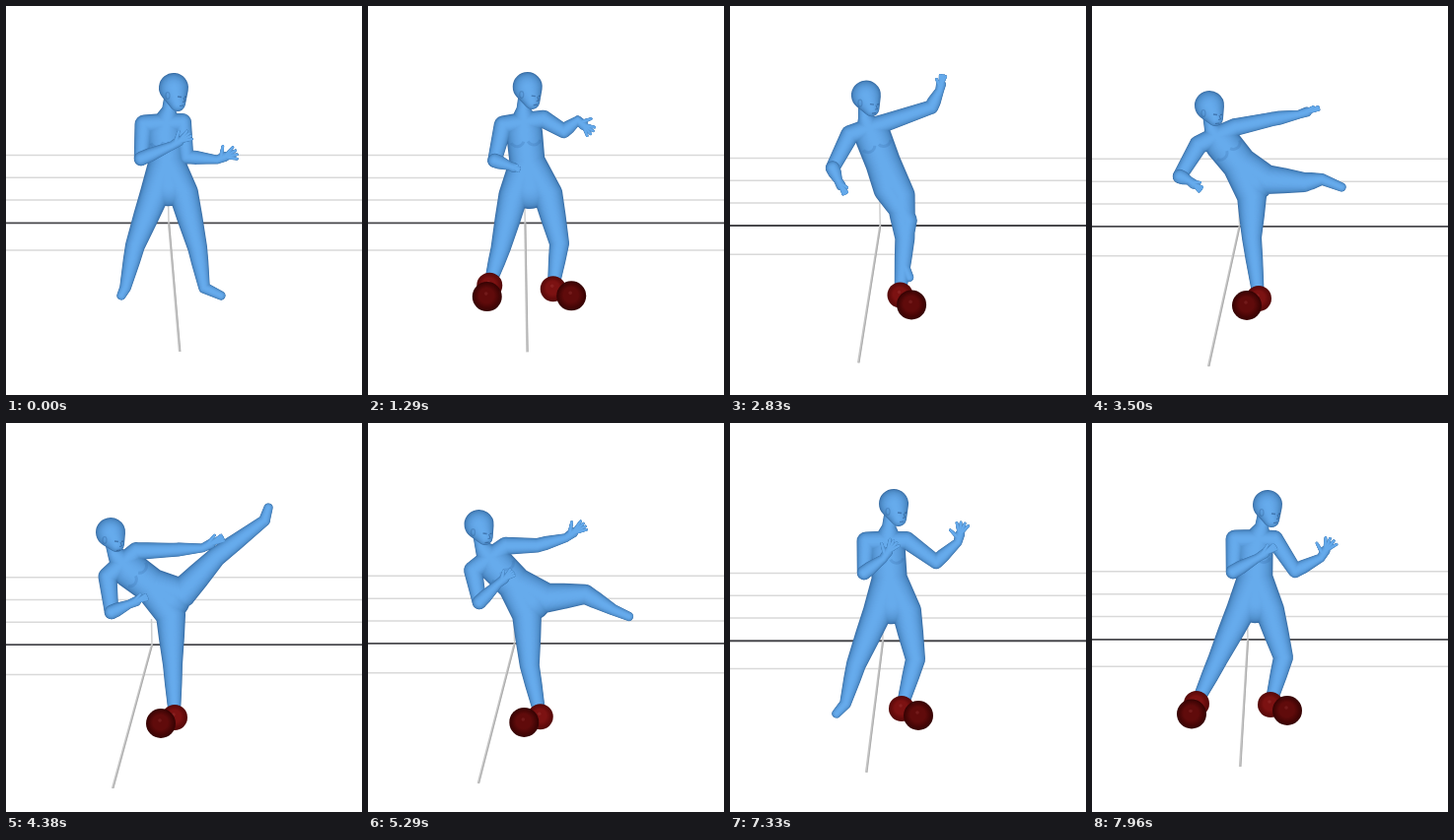
Recreate the animation shown at these times as an HTML page with a canvas. Size 361x395 px, loop 8000 ms.

```html
<!DOCTYPE html>
<html lang="en">
<head>
<meta charset="utf-8">
<title>Side kick</title>
<style>
  html, body { margin: 0; width: 100%; height: 100%; overflow: hidden; background: #fff; }
  canvas { display: block; width: 361px; height: 395px; }
</style>
</head>
<body>
<canvas id="stage" width="361" height="395"></canvas>
<script>
const ctx = document.getElementById('stage').getContext('2d');
const LOOP = 8000;
const tracks = {};

// A pose may list only some joints; each joint keeps its own timeline.
// Suffixes: A = guarding arm, B = reaching arm, K = kicking leg, S = standing leg.
function pose(time, joints) {
  for (const name in joints) (tracks[name] ||= []).push({ time, value: joints[name] });
}

pose(0, {
  head: [170, 83], jaw: [174, 99], neck: [165, 106],
  shoulderA: [140, 120], elbowA: [137, 155], wristA: [168, 142], tipA: [186, 131], spreadA: [.25],
  shoulderB: [179, 118], elbowB: [183, 153], wristB: [214, 156], tipB: [233, 149], spreadB: [.35],
  hipK: [151, 190], kneeK: [131, 243], heelK: [121, 286], toeK: [117, 294],
  hipS: [180, 190], kneeS: [194, 245], heelS: [201, 286], toeS: [218, 294],
  axis: [165], axisEnd: [176, 351]
});
pose(900, { heelK: [120, 286], toeK: [117, 296], tipB: [233, 147], axisEnd: [168, 351] });
pose(1650, { axisEnd: [154, 352], heelK: [128, 282], toeK: [126, 294] });
pose(2250, {
  head: [152, 84], jaw: [157, 98], neck: [149, 107],
  shoulderA: [132, 124], elbowA: [119, 160], wristA: [125, 175], tipA: [130, 187], spreadA: [.15],
  shoulderB: [173, 114], elbowB: [210, 107], wristB: [212, 86], tipB: [207, 67], spreadB: [.32],
  hipK: [149, 192], kneeK: [144, 243], heelK: [139, 285], toeK: [138, 294],
  hipS: [181, 192], kneeS: [190, 238], heelS: [178, 289], toeS: [196, 296],
  axis: [155], axisEnd: [141, 354]
});
pose(2520, { elbowB: [213, 99], wristB: [213, 77], tipB: [209, 58], axisEnd: [136, 360] });
pose(2900, {
  kneeK: [184, 214], heelK: [180, 255], toeK: [188, 270],
  heelS: [172, 294], toeS: [182, 304]
});
pose(3500, {
  head: [119, 101], jaw: [125, 114], neck: [121, 125],
  shoulderA: [108, 141], elbowA: [89, 173], wristA: [98, 177], tipA: [110, 186], spreadA: [.2],
  shoulderB: [145, 123], elbowB: [182, 115], wristB: [210, 110], tipB: [229, 104], spreadB: [.08],
  hipK: [176, 176], kneeK: [215, 179], heelK: [233, 176], toeK: [253, 184],
  hipS: [162, 193], kneeS: [162, 235], heelS: [169, 297], toeS: [157, 304],
  axis: [149.5], axisEnd: [118, 366]
});
pose(3900, { kneeK: [220, 160], heelK: [254, 136], toeK: [268, 127] });
pose(4380, {
  head: [106, 111], jaw: [112, 123], neck: [110, 133],
  shoulderA: [103, 156], elbowA: [107, 192], wristA: [125, 184], tipA: [142, 177], spreadA: [.15],
  shoulderB: [132, 130], elbowB: [165, 129], wristB: [199, 127], tipB: [219, 117], spreadB: [.15],
  hipK: [178, 173], kneeK: [213, 136], heelK: [262, 99], toeK: [266, 86],
  hipS: [167, 195], kneeS: [169, 245], heelS: [171, 299], toeS: [157, 305],
  axis: [148], axisEnd: [108, 371]
});
pose(5040, { axisEnd: [110, 368] });
pose(5250, { kneeK: [220, 172], heelK: [250, 186], toeK: [266, 192] });
pose(6130, {
  head: [126, 93], jaw: [132, 107], neck: [127, 118],
  shoulderA: [114, 139], elbowA: [118, 168], wristA: [137, 143], tipA: [148, 130], spreadA: [.3],
  shoulderB: [152, 119], elbowB: [183, 121], wristB: [207, 107], tipB: [222, 92], spreadB: [.35],
  hipK: [178, 183], kneeK: [215, 212], heelK: [202, 254], toeK: [207, 275],
  hipS: [158, 193], kneeS: [162, 245], heelS: [178, 297], toeS: [163, 303],
  axis: [150], axisEnd: [119, 360]
});
pose(6690, {
  kneeK: [176, 231], heelK: [160, 268], toeK: [160, 284],
  heelS: [178, 296], toeS: [181, 304], axisEnd: [126, 368]
});
pose(7330, {
  head: [166, 82], jaw: [171, 97], neck: [161, 106],
  shoulderA: [138, 120], elbowA: [136, 152], wristA: [155, 138], tipA: [167, 121], spreadA: [.3],
  shoulderB: [179, 119], elbowB: [209, 141], wristB: [231, 121], tipB: [236, 102], spreadB: [.35],
  hipK: [150, 191], kneeK: [128, 245], heelK: [117, 285], toeK: [108, 295],
  hipS: [179, 191], kneeS: [188, 240], heelS: [174, 290], toeS: [191, 297],
  axis: [155], axisEnd: [138, 355]
});
pose(7960, {
  head: [178, 83], jaw: [182, 98], neck: [172, 106],
  shoulderA: [145, 118], elbowA: [143, 151], wristA: [168, 137], tipA: [185, 126], spreadA: [.15],
  shoulderB: [185, 118], elbowB: [206, 150], wristB: [232, 137], tipB: [243, 119], spreadB: [.35],
  hipK: [151, 190], kneeK: [127, 241], heelK: [106, 285], toeK: [101, 295.5],
  hipS: [180, 190], kneeS: [194, 238], heelS: [181, 286], toeS: [198, 292],
  axis: [158], axisEnd: [150, 349]
});

// Cubic Hermite through the keys of one joint.
function sample(keys, t) {
  const last = keys.length - 1;
  t = Math.min(t, keys[last].time);
  let i = 0;
  while (i < last - 1 && t >= keys[i + 1].time) i++;
  const a = keys[i], b = keys[i + 1];
  const span = b.time - a.time, u = (t - a.time) / span;
  const slope = (k, n) => {
    const p = keys[Math.max(k - 1, 0)], q = keys[Math.min(k + 1, last)];
    return (q.value[n] - p.value[n]) / (q.time - p.time) * span;
  };
  return a.value.map((from, n) => {
    const d = b.value[n] - from, m0 = slope(i, n), m1 = slope(i + 1, n);
    return from + u * (m0 + u * (3 * d - 2 * m0 - m1 + u * (m0 + m1 - 2 * d)));
  });
}

const mix = (a, b, u) => a.map((v, n) => v + (b[n] - v) * u);
const dist = (a, b) => Math.hypot(b[0] - a[0], b[1] - a[1]);
const at = (p, r) => ({ p, r });

function capsule(a, b, s) {
  const ra = a.r * s, rb = b.r * s;
  const d = dist(a.p, b.p) || .01;
  const dir = Math.atan2(b.p[1] - a.p[1], b.p[0] - a.p[0]);
  const phi = Math.acos(Math.max(-1, Math.min(1, (ra - rb) / d)));
  ctx.moveTo(a.p[0] + ra * Math.cos(dir + phi), a.p[1] + ra * Math.sin(dir + phi));
  ctx.arc(a.p[0], a.p[1], ra, dir + phi, dir - phi + 2 * Math.PI);
  ctx.arc(b.p[0], b.p[1], rb, dir - phi, dir + phi);
  ctx.closePath();
}

// Nested shrinking copies give a rounded, lit surface.
const EDGE = [56, 110, 166], LIT = [103, 172, 237];
function solid(limbs) {
  for (let s = 1; s > .15; s -= .06) {
    ctx.fillStyle = `rgb(${mix(EDGE, LIT, (1 - s * s) ** .55).map(Math.round)})`;
    ctx.beginPath();
    for (const limb of limbs)
      for (let i = 1; i < limb.length; i++) capsule(limb[i - 1], limb[i], s);
    ctx.fill();
  }
}

function hand(wrist, tip, spread) {
  const palm = mix(wrist, tip, .42);
  const dir = Math.atan2(tip[1] - wrist[1], tip[0] - wrist[0]);
  const len = dist(wrist, tip);
  const finger = (from, angle, l) =>
    [at(from, 2.4), at([from[0] + l * Math.cos(dir + angle), from[1] + l * Math.sin(dir + angle)], 1.3)];
  const fingers = [-1.5, -.5, .5, 1.5].map(n => finger(palm, n * spread, len * .62));
  return [[at(wrist, 4.4), at(palm, 5)], finger(mix(wrist, tip, .2), -spread * 3, len * .62), ...fingers];
}

const arm = (elbow, wrist) => [at(elbow, 7.2), at(mix(elbow, wrist, .3), 7), at(wrist, 4.4)];

const leg = (hip, knee, heel, toe) => [
  at(hip, 15), at(mix(hip, knee, .45), 13), at(knee, 10),
  at(mix(knee, heel, .35), 8.8), at(heel, 5.8), at(toe, 4.6)
];

function stroke(color, width, ...points) {
  ctx.strokeStyle = color;
  ctx.lineWidth = width;
  ctx.beginPath();
  points.forEach(p => ctx.lineTo(...p));
  ctx.stroke();
}

function drawFloor(j) {
  const low = (j.axisEnd[1] - 351) / 19;
  const lines = [[151.4, 5], [174.3, 5], [197, 5], [247.9, 7.3]];
  for (const [y, shift] of lines)
    stroke('#d9d9d9', 1.5, [0, y + shift * low], [361, y + shift * low]);
  const horizon = 220.3 + 4.5 * low;
  stroke('#48484c', 1.8, [0, horizon], [361, horizon]);
  const origin = [j.axis[0], horizon];
  stroke('#cfcfcf', 1.5, [origin[0] - .5, horizon - 26], origin);
  stroke('#c6c6c6', 2.2, origin, j.axisEnd);
  stroke('#a4a4a4', .8, [origin[0] + .6, horizon], [j.axisEnd[0] + 1, j.axisEnd[1]]);
}

function drawFace([x, y]) {
  const shade = 'rgba(32,72,122,.5)';
  stroke(shade, 1.4, [x + 4, y + 9], [x + 8, y + 9.5]);
  stroke(shade, 1.3, [x + 11, y + 9.5], [x + 13, y + 9]);
  stroke(shade, 1, [x + 10, y + 10], [x + 11.5, y + 14], [x + 9, y + 14.5]);
  stroke(shade, 1.2, [x + 6, y + 18.5], [x + 10, y + 18]);
  ctx.strokeStyle = 'rgba(40,85,140,.3)';
  ctx.beginPath();
  ctx.ellipse(x - 6, y + 8, 2, 3.5, 0, 0, 7);
  ctx.stroke();
}

function drawChest(chest, waist) {
  ctx.save();
  ctx.translate(...mix(chest, waist, .2));
  ctx.rotate(Math.atan2(waist[1] - chest[1], waist[0] - chest[0]) - Math.PI / 2);
  ctx.strokeStyle = 'rgba(45,95,155,.2)';
  ctx.lineWidth = 3;
  for (const x of [-8, 9]) {
    ctx.beginPath();
    ctx.arc(x, 0, 7, .4, 2.7);
    ctx.stroke();
  }
  ctx.restore();
}

function drawBody(j) {
  const top = mix(j.shoulderA, j.shoulderB, .5), hips = mix(j.hipK, j.hipS, .5);
  const chest = mix(top, hips, .15), waist = mix(top, hips, .55), pelvis = mix(top, hips, .88);
  solid([
    [at(j.neck, 7), at(chest, 18.5), at(waist, 18), at(pelvis, 16 + dist(j.hipK, j.hipS) * .2)],
    [at(waist, 18), at(j.hipK, 15)],
    [at(waist, 18), at(j.hipS, 15)],
    [at(j.shoulderA, 9.5), at(top, 10), at(j.shoulderB, 9)],
    [at(j.shoulderA, 9.5), at(j.elbowA, 7.2)],
    [at(j.shoulderB, 9), ...arm(j.elbowB, j.wristB)],
    ...hand(j.wristB, j.tipB, j.spreadB[0]),
    leg(j.hipS, j.kneeS, j.heelS, j.toeS),
    leg(j.hipK, j.kneeK, j.heelK, j.toeK),
    [at(j.head, 8), at(j.neck, 7)]
  ]);
  drawChest(chest, waist);
  solid([[at(j.head, 15), at(j.jaw, 8)]]);
  drawFace(j.head);
  solid([arm(j.elbowA, j.wristA), ...hand(j.wristA, j.tipA, j.spreadA[0])]);
}

function ball([x, y], r, inner, outer) {
  const g = ctx.createRadialGradient(x - 1, y - 2, 0, x, y, r);
  g.addColorStop(0, inner);
  g.addColorStop(.5, inner);
  g.addColorStop(1, outer);
  ctx.fillStyle = g;
  ctx.beginPath();
  ctx.arc(x, y, r, 0, 7);
  ctx.fill();
  ctx.fillStyle = 'rgba(190,90,90,.2)';
  ctx.beginPath();
  ctx.arc(x - 1, y - 3, 1.8, 0, 7);
  ctx.fill();
}

function contact(heel, toe) {
  ball(heel, 13, '#7c1212', '#520606');
  ball(toe, 15, '#600b0b', '#340202');
}

function draw(t) {
  const j = {};
  for (const name in tracks) j[name] = sample(tracks[name], t);
  ctx.fillStyle = '#fff';
  ctx.fillRect(0, 0, 361, 395);
  drawFloor(j);
  drawBody(j);
  if (t >= 40) contact(j.heelS, j.toeS);
  if ((t >= 40 && t < 1500) || t >= 7500) contact(j.heelK, j.toeK);
}

const start = performance.now();
function tick() {
  draw((performance.now() - start) % LOOP);
  requestAnimationFrame(tick);
}
tick();
</script>
</body>
</html>
```
